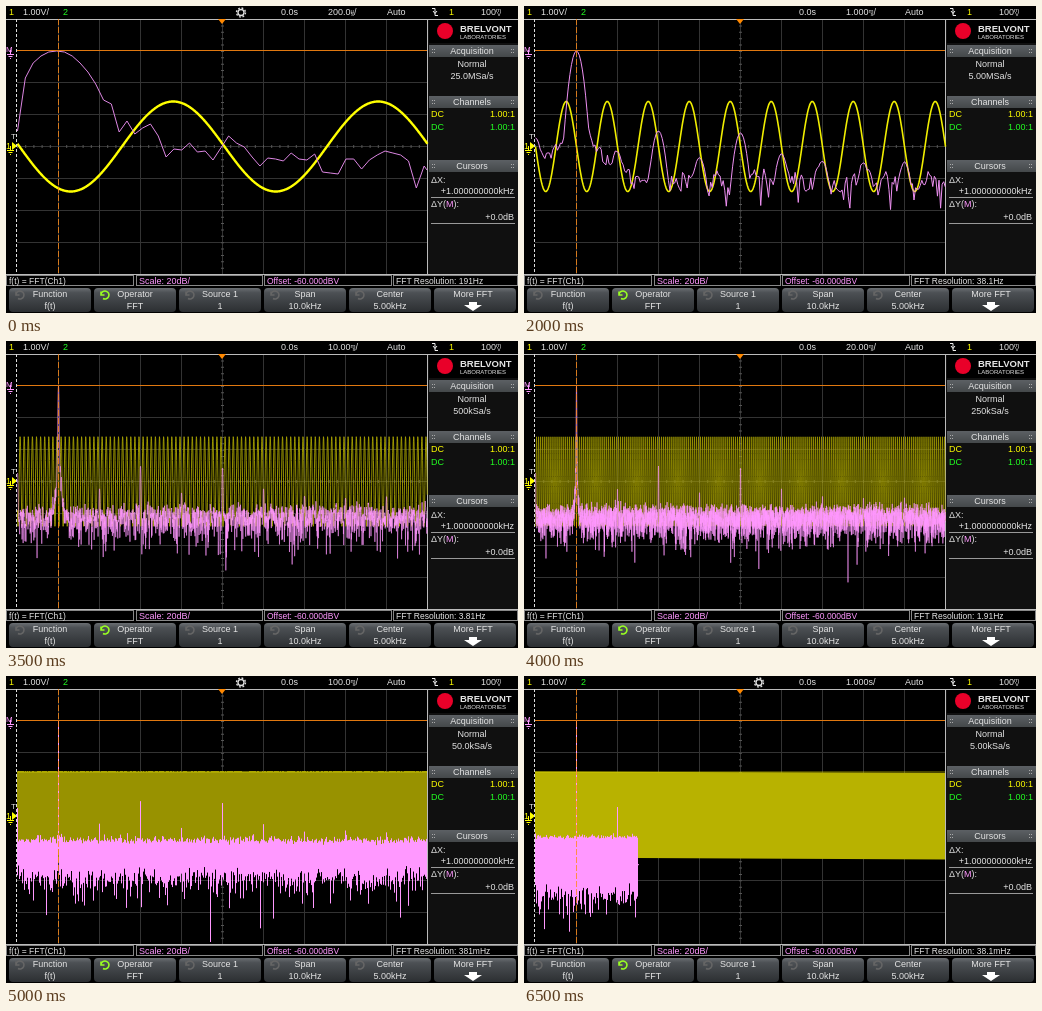
Recreate the animation shown at these times as an HTML page with a canvas. Size 512 px wide and 307 px high, loop 7 s.

```html
<!DOCTYPE html>
<html lang="en">
<head>
<meta charset="utf-8">
<title>Oscilloscope FFT resolution</title>
<style>
  html, body { margin: 0; width: 100%; height: 100%; overflow: hidden; background: #000; }
  svg, canvas { position: absolute; left: 0; top: 0; width: 512px; height: 307px; }
  text { font: 9px "Liberation Sans", Arial, sans-serif; fill: #e4e4e4; white-space: pre; }
  .mid { text-anchor: middle; }
  .end { text-anchor: end; }
  .bar { font-size: 8.5px; }
  .tiny { font-size: 6px; }
  .yellow { fill: #ff0; }
  .green { fill: #2f2; }
  .pink { fill: #f9f; }
  .line { fill: none; stroke: currentColor; }
</style>
</head>
<body>
<svg id="ui" viewBox="0 0 512 307">
  <defs>
    <linearGradient id="key" x2="0" y2="1">
      <stop stop-color="#6a6e72"/><stop offset=".2" stop-color="#4c5054"/><stop offset="1" stop-color="#2c2f32"/>
    </linearGradient>
    <linearGradient id="head" x2="0" y2="1">
      <stop stop-color="#5c6064"/><stop offset="1" stop-color="#44484a"/>
    </linearGradient>
    <g id="ground" class="line">
      <path d="M4.500 0V4M1 4.500H8M2.500 6.500H6.500M4 8.500H5"/>
    </g>
    <path id="knob" class="line" stroke-width="1.600" d="M-3 -3.500V0H.5M-3 -.5A4 4 0 1 1 -1 3.500"/>
  </defs>

  <g id="grid"></g>

  <!-- top bar -->
  <text class="yellow" x="3" y="9">1</text>
  <text x="17" y="9">1.00V/</text>
  <text class="green" x="57" y="9">2</text>
  <g id="gear" fill="none" stroke="#ddd" stroke-width="1.400">
    <circle cx="235" cy="6.500" r="3"/>
    <circle cx="235" cy="6.500" r="4.500" stroke-dasharray="1.770 1.770"/>
  </g>
  <text x="275" y="9">0.0s</text>
  <text id="timebase" x="322" y="9"></text>
  <text x="381" y="9">Auto</text>
  <path d="M426 2.500H429V9.500H432M427 5L429 7.500L431 5" fill="none" stroke="#eee"/>
  <text class="yellow" x="443" y="9">1</text>
  <text x="475" y="9">100<tspan class="tiny" dy="-3">m</tspan><tspan class="tiny" dx="-4" dy="4">V</tspan></text>

  <!-- left markers -->
  <text class="pink" x="0" y="46" style="font-size:8px">M</text>
  <use href="#ground" x="0" y="44" color="#f9f"/>
  <text x="5" y="133" style="font-size:8px">T</text>
  <text class="yellow" x="0" y="143">1</text>
  <use href="#ground" x="0" y="140" color="#ff0"/>
  <path d="M6 136L11 140L6 144Z" fill="#ff0"/>

  <!-- side panel -->
  <rect x="422" y="13" width="90" height="255" fill="#101010"/>
  <rect x="423" y="14" width="89" height="23" fill="#000"/>
  <circle cx="439" cy="25" r="8" fill="#e90029"/>
  <text x="454" y="26" style="font-size:9.500px;font-weight:bold">BRELVONT</text>
  <text x="454" y="33" class="tiny">LABORATORIES</text>
  <g id="heads"></g>
  <text class="mid" x="466" y="61">Normal</text>
  <text class="mid" x="466" y="73" id="rate"></text>
  <text class="yellow" x="425" y="111">DC</text>
  <text class="yellow end" x="509" y="111">1.00:1</text>
  <text class="green" x="425" y="124">DC</text>
  <text class="green end" x="509" y="124">1.00:1</text>
  <text x="425" y="177">ΔX:</text>
  <text class="end" x="508" y="188">+1.000000000kHz</text>
  <text x="425" y="201">ΔY(<tspan class="pink">M</tspan>):</text>
  <text class="end" x="508" y="214">+0.0dB</text>
  <path d="M425 191.500H509M425 217.500H509" stroke="#999"/>
  <path d="M0 13.500H512M0 268.500H512M421.500 13V269" fill="none" stroke="#bbb"/>
  <path d="M212 13H220L216 18Z" fill="#f80"/>

  <!-- status line and softkeys -->
  <g id="status"></g>
  <text class="bar" x="3" y="278">f(t) = FFT(Ch1)</text>
  <text class="pink" x="133" y="278">Scale: 20dB/</text>
  <text class="bar pink" x="261" y="278">Offset: -60.000dBV</text>
  <text class="bar" x="390" y="278" id="resolution"></text>
  <g id="keys"></g>
  <path d="M463 296H471V299H476L467 305L458 299H463Z" fill="#fff"/>
</svg>
<canvas id="plot" width="512" height="307"></canvas>

<script>
const LEFT = 11, TOP = 13, WIDTH = 410, HEIGHT = 255, DIV = 41;
const PER_KHZ = 41, REF_Y = 45, FLOOR_Y = 174, PX_PER_DB = 1.6;
const MID_Y = 140.5, AMPLITUDE = 45;

const byId = id => document.getElementById(id);
const ctx = byId("plot").getContext("2d");

// Start time and timebase in ms per division.
const STEPS = [
  [0, .2], [1000, .5], [2000, 1], [2500, 2], [3000, 5], [3500, 10],
  [4000, 20], [4500, 50], [5000, 100], [5500, 200], [6000, 500], [6500, 1000]
].map(([start, timebase]) => ({ start, timebase, rate: 5e6 / timebase }));
const LOOP = 7000;

// Peak heights of the harmonics, indexed by kHz.
const TONES = [132, 45, 148, 125, 152, 127, 148, 156, 158, 157];
const ALIASED_TONES = [160, 45, 148, 124, 146, 126, 148, 133, 142, 142];
const SLOW_TONES = [160, 45, 131];

const COARSE = [
  125, 72, 57, 50, 46, 45, 46, 50, 57, 66, 78, 94, 98, 126, 115, 128, 122, 118,
  130, 151, 143, 144, 137, 146, 145, 154, 142, 130, 137, 141, 151, 160, 152, 153,
  155, 147, 153, 154, 148, 166, 167, 168, 153, 153, 163, 154, 149, 145, 147, 149,
  155, 182, 160, 164
];

function buildStage() {
  let grid = "";
  for (let i = 1; i < 10; i++) {
    grid += `<path d="M${LEFT + i * DIV + .5} ${TOP}V268" stroke="#333"/>`;
  }
  for (let i = 1; i < 8; i++) {
    const y = Math.floor(TOP + i * HEIGHT / 8) + .5;
    grid += `<path d="M${LEFT} ${y}H421" stroke="#333"/>`;
  }
  grid += `<path d="M216.500 ${TOP}V268" stroke="#555" stroke-width="3" stroke-dasharray="1 5.375"/>
    <path d="M${LEFT} 140.500H421" stroke="#555" stroke-width="3" stroke-dasharray="1 7.200"/>`;
  byId("grid").innerHTML = grid;

  const dots = x => [0, 2].map(dx => [0, 3].map(dy =>
    `<rect x="${x + dx}" y="${dy + 4}" width="1" height="1" fill="#aaa"/>`).join("")).join("");
  byId("heads").innerHTML = [["Acquisition", 39], ["Channels", 90], ["Cursors", 154]].map(([label, y]) =>
    `<g transform="translate(0 ${y})"><rect x="423" width="89" height="12" fill="url(#head)"/>
      ${dots(426)}${dots(505)}<text class="mid" x="466" y="9">${label}</text></g>`).join("");

  byId("status").innerHTML = [0, 130, 258, 387].map((x, i) =>
    `<rect x="${x + .5}" y="269.500" width="${[127, 126, 127, 124][i]}" height="10" fill="#000" stroke="#888"/>`).join("");

  const keys = [["Function", "f(t)", 3], ["Operator", "FFT", 88], ["Source 1", "1", 173],
    ["Span", "10.0kHz", 258], ["Center", "5.00kHz", 343], ["More FFT", "", 428]];
  byId("keys").innerHTML = keys.map(([label, value, x], i) => {
    const center = x + (i === 5 ? 39 : 41);
    const knob = i < 5 ? `<use href="#knob" x="${x + 10}" y="289" color="${i === 1 ? "#9f2" : "#666"}"/>` : "";
    return `<rect x="${x}" y="282" width="82" height="24" rx="4" fill="url(#key)"/>${knob}
      <text class="mid" x="${center}" y="291">${label}</text>
      <text class="mid" x="${center}" y="303">${value}</text>`;
  }).join("");
}

function engineering(value, digits) {
  const [factor, prefix] = [[1e6, "M"], [1e3, "k"], [1, ""], [1e-3, "m"], [1e-6, "µ"]]
    .find(([size]) => value >= size * .99999);
  return [(value / factor).toPrecision(digits), prefix];
}

function seeded(seed) {
  return () => {
    seed = (seed + 0x6D2B79F5) | 0;
    let t = Math.imul(seed ^ seed >>> 15, 1 | seed);
    t ^= t + Math.imul(t ^ t >>> 7, 61 | t);
    return ((t ^ t >>> 14) >>> 0) / 4294967296;
  };
}

const toPower = px => 10 ** (-px / (10 * PX_PER_DB));
const toY = power => REF_Y - 10 * PX_PER_DB * Math.log10(power + 1e-14);

// Drop in pixels of the window's main lobe and skirt, by distance in bins.
function lobe(bins) {
  return bins < 7.5 ? 1.32 * bins * bins : 76 + 22 * Math.log2(bins / 7.5);
}

function spectrum(step, index) {
  const random = seeded(index * 977 + 5);
  const resolution = step.rate / 131072;
  const count = Math.floor(Math.min(10000, step.rate / 2) / resolution);
  const tones = index === 11 ? SLOW_TONES : index > 8 ? ALIASED_TONES : TONES;
  const floor = toPower(FLOOR_Y - REF_Y);
  const recent = [];
  const points = [];
  for (let i = 0; i <= count; i++) {
    do {
      const radius = Math.sqrt(-Math.log(1 - random()));
      const angle = random() * 2 * Math.PI;
      recent.push([radius * Math.cos(angle), radius * Math.sin(angle)]);
    } while (recent.length < 3);
    if (recent.length > 3) recent.shift();
    const re = recent.reduce((sum, p) => sum + p[0], 0);
    const im = recent.reduce((sum, p) => sum + p[1], 0);
    const noise = (re * re + im * im) / 3;
    const khz = i * resolution / 1000;
    let power = floor * noise;
    tones.forEach((y, tone) => {
      const bins = Math.abs(khz - tone) * 1000 / resolution;
      const ripple = bins > 8 ? .2 + .8 * noise : 1;
      if (bins < 400) power += toPower(y - REF_Y + lobe(bins)) * ripple;
    });
    points.push([LEFT + .5 + khz * PER_KHZ, Math.min(toY(power), 266)]);
  }
  return points;
}

function strokePoints(points, color, width) {
  ctx.beginPath();
  points.forEach(([x, y]) => ctx.lineTo(x, y));
  ctx.strokeStyle = color;
  ctx.lineWidth = width;
  ctx.lineJoin = "round";
  ctx.stroke();
}

function drawSignal({ timebase }, index) {
  if (timebase <= 20) {
    const period = DIV / timebase;
    const points = [];
    const step = Math.min(.5, period / 16);
    for (let x = LEFT; x <= LEFT + WIDTH; x += step) {
      const phase = 2 * Math.PI * ((x - 215.5) / period - .012);
      points.push([x + .5, MID_Y + AMPLITUDE * Math.sin(phase)]);
    }
    const colors = ["#ff0", "#f8f800", "#f0ee00", "#d8d400", "#b0aa00", "#a8a200", "#a8a200"];
    strokePoints(points, colors[index], [2.4, 2, 1.6, 1.2, 1, .9, .75][index]);
    return;
  }
  const random = seeded(index);
  const shade = { 50: 142, 100: 152, 200: 164, 500: 176, 1000: 184 }[timebase];
  const slow = timebase === 1000;
  for (let i = 0; i < WIDTH; i++) {
    const beat = timebase === 50 ? 10 * Math.sin(i * 2 * Math.PI * 41 / 50) : 0;
    const level = Math.round(shade + beat);
    const drift = i / WIDTH;
    const top = slow ? 95.5 + drift * 1.5 : 95 + (random() < .3 ? .6 : 0);
    const bottom = slow ? 181.5 + drift * 2 : 186;
    ctx.fillStyle = `rgb(${level},${level - 6},0)`;
    ctx.fillRect(LEFT + i, top, 1, bottom - top);
  }
  if (timebase >= 100) {
    ctx.fillStyle = "rgba(225,220,0,.6)";
    ctx.fillRect(LEFT, 95.5, WIDTH, 1);
  }
}

function drawSpectrum(step, index) {
  if (index === 0) {
    strokePoints(COARSE.map((y, i) => [Math.min(LEFT + .5 + i * 7.82, 421), y]), "#dc86e2", 1);
    return;
  }
  const points = spectrum(step, index);
  if (index < 7) {
    strokePoints(points, index < 4 ? "#ee90f2" : "#ff98ff", index < 5 ? 1 : .6);
    return;
  }
  const columns = [];
  for (const [x, y] of points) {
    const column = columns[Math.floor(x) - LEFT] ||= [y, y];
    column[0] = Math.min(column[0], y);
    column[1] = Math.max(column[1], y);
  }
  ctx.fillStyle = "#ff98ff";
  columns.forEach(([top, bottom], i) => {
    if (i >= WIDTH) return;
    const low = Math.max(bottom, columns[i - 1]?.[0] ?? 0, columns[i + 1]?.[0] ?? 0);
    ctx.fillRect(LEFT + i, top, 1, Math.max(1, low - top));
  });
}

function drawCursor(x, y, x2, y2, color, dash = []) {
  ctx.lineWidth = 1;
  ctx.strokeStyle = color;
  ctx.setLineDash(dash);
  ctx.beginPath();
  ctx.moveTo(x, y);
  ctx.lineTo(x2, y2);
  ctx.stroke();
  ctx.setLineDash([]);
}

function drawCursors() {
  const bottom = TOP + HEIGHT;
  drawCursor(LEFT, 44.5, LEFT + WIDTH, 44.5, "#e07810");
  drawCursor(52.5, TOP, 52.5, bottom, "rgba(255,140,26,.8)", [6, 2]);
  drawCursor(10.5, TOP, 10.5, bottom, "#ddd", [3, 2]);
}

function showReadings({ timebase, rate }) {
  const [time, prefix] = engineering(timebase / 1000, 4);
  byId("timebase").innerHTML = prefix
    ? `${time}<tspan class="tiny" dy="-2">${prefix}</tspan><tspan class="tiny" dx="-3" dy="3">s</tspan><tspan dy="-1">/</tspan>`
    : `${time}s/`;
  byId("gear").style.display = timebase >= 1 && timebase <= 20 ? "none" : "";
  byId("rate").textContent = engineering(rate, 3).join("") + "Sa/s";
  byId("resolution").textContent = "FFT Resolution: " + engineering(rate / 131072, 3).join("") + "Hz";
}

let shown = -1;
function tick(now) {
  const time = now % LOOP;
  const index = STEPS.findLastIndex(step => step.start <= time);
  if (index !== shown) {
    shown = index;
    const step = STEPS[index];
    ctx.clearRect(0, 0, 512, 307);
    drawSignal(step, index);
    drawSpectrum(step, index);
    drawCursors();
    showReadings(step);
  }
  requestAnimationFrame(tick);
}

buildStage();
tick(performance.now());
</script>
</body>
</html>
```
